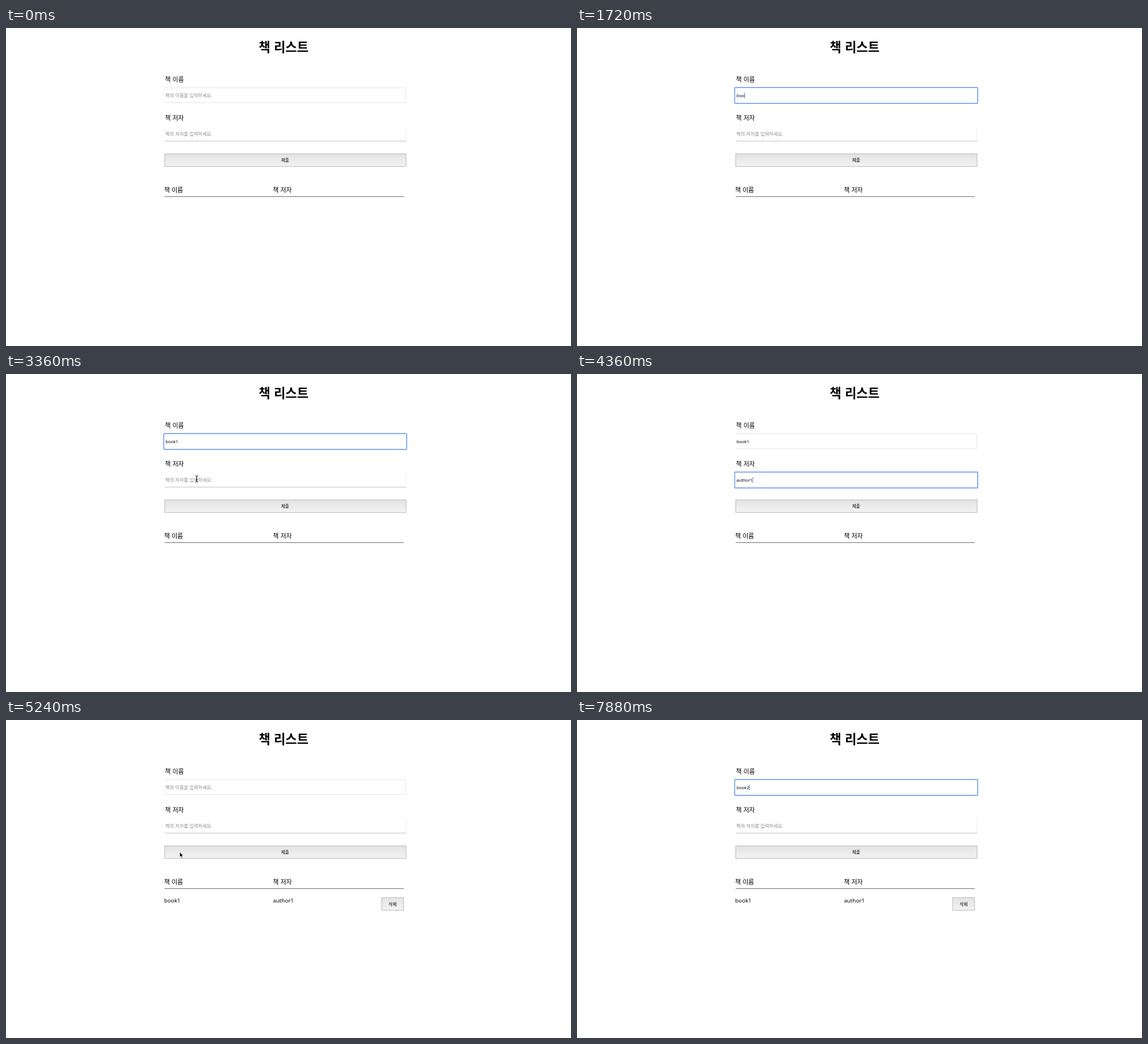
An HTML page for the animation above (8000 ms loop, 997 by 561 pixels).

```html
<!DOCTYPE html>
<html lang="ko">
<head>
<meta charset="utf-8">
<style>
  html, body { margin: 0; width: 100%; height: 100%; overflow: hidden; background: #fff; }
  svg { display: block; font-family: "Noto Sans CJK KR", "Noto Sans CJK JP", sans-serif; }
  .title { font-size: 22.2px; font-weight: 700; text-anchor: middle; }
  .label { font-size: 11px; font-weight: 500; }
  .hint { font-size: 8.3px; fill: #8c8c8c; }
  .typed { font: 7.6px "Noto Sans", sans-serif; }
  .cell { font: 9.8px "Noto Sans", sans-serif; }
  .small { font-size: 7.7px; text-anchor: middle; }
  .button { fill: url(#shade); stroke: #b8b8b8; }
  .ring { fill: #fff; stroke: #84adf0; stroke-width: 2; }
  .caret { fill: #3478c8; }
</style>
</head>
<body>
<svg width="997" height="561" viewBox="0 0 997 561">
  <defs>
    <linearGradient id="shade" x2="0" y2="1">
      <stop offset="0" stop-color="#e3e3e3"/>
      <stop offset=".5" stop-color="#ebebeb"/>
      <stop offset="1" stop-color="#f3f3f3"/>
    </linearGradient>
  </defs>
  <text class="title" x="490" y="42.4">책 리스트</text>
  <text class="label" x="280.5" y="95.2">책 이름</text>
  <text class="label" x="280.5" y="163.2">책 저자</text>

  <g id="name">
    <path d="M280 105.5H705.5V131.5H280" fill="none" stroke="#e4e4e4"/>
    <rect class="ring" x="278.3" y="105" width="428.7" height="28" rx="1"/>
    <text class="hint" x="281" y="122.1">책의 이름을 입력하세요.</text>
    <text class="typed" x="281.5" y="122.3"></text>
    <rect class="caret" y="114" width="1" height="10"/>
  </g>
  <g id="author">
    <path d="M705.5 174V199" fill="none" stroke="#eee"/>
    <path d="M280 199.5H706" stroke="#c2c2c2"/>
    <rect class="ring" x="278.3" y="173" width="428.7" height="28" rx="1"/>
    <text class="hint" x="281" y="190.1">책의 저자를 입력하세요.</text>
    <text class="typed" x="281.2" y="190.3"></text>
    <rect class="caret" y="182" width="1" height="10"/>
  </g>

  <rect class="button" x="280" y="222" width="426" height="22.3"/>
  <text class="small" x="492.5" y="236">제출</text>

  <text class="label" x="279" y="290.2">책 이름</text>
  <text class="label" x="471" y="290.2">책 저자</text>
  <path d="M280 297.5H702" stroke="#6c6c6c"/>

  <g id="row">
    <text class="cell" x="279" y="322">book1</text>
    <text class="cell" x="471" y="322">author1</text>
    <rect class="button" x="663" y="313.3" width="38.5" height="22.3"/>
    <text class="small" x="682.3" y="327.5">삭제</text>
  </g>

  <path id="arrow" d="M0 0V9L2.1 7.1L3.7 10.6L5.2 9.9L3.7 6.5H6.4Z" stroke="#fff" stroke-width=".7"/>
  <path id="beam" d="M-2.5 -5.5Q0 -5.5 0 -4Q0 -5.5 2.5 -5.5M0 -4V4M-2.5 5.5Q0 5.5 0 4Q0 5.5 2.5 5.5M-1.3 1.5H1.3" fill="none" stroke="#111"/>
</svg>
<script>
const LOOP = 8000, STEP = 40;
const $ = id => document.getElementById(id);
const show = (el, on) => el.style.display = on ? '' : 'none';
const within = (t, [a, b]) => t >= a && t < b;

// Each session: focus time, blur time, caret end, text, key times
const sessions = {
  name: [
    { focus: [800, 3400], clear: 5200, caretEnd: 2640, text: 'book1', keys: [1360, 1640, 1720, 1920, 2400] },
    { focus: [6240, LOOP], clear: LOOP, caretEnd: LOOP, text: 'book2', keys: [6520, 6880, 6960, 7520, 7880] }
  ],
  author: [
    { focus: [3400, 5200], clear: 5200, caretEnd: 4960, text: 'author1', keys: [3760, 3920, 4000, 4080, 4160, 4200, 4360] }
  ]
};

// Pointer trips: time, x, y
const trips = [
  [[360, 440, 372], [560, 436, 240], [720, 435, 127], [800, 435, 121], [1360, 435, 121]],
  [[2480, 435, 119], [2600, 434, 107], [2840, 395, 132], [3080, 346, 172], [3200, 336.5, 181], [3280, 336.5, 185], [3760, 336.5, 185]],
  [[4600, 336.5, 185], [4760, 325, 207], [4960, 308, 231], [5080, 306.5, 233],
   [5560, 306.5, 233], [5760, 324, 195], [5960, 360, 135], [6040, 365.5, 127], [6520, 365.5, 127]]
];

function pointerAt(t) {
  const trip = trips.find(p => within(t, [p[0][0], p.at(-1)[0]]));
  if (!trip) return null;
  const i = trip.findIndex(p => p[0] > t);
  const [t0, x0, y0] = trip[i - 1], [t1, x1, y1] = trip[i];
  const k = (t - t0) / (t1 - t0);
  return [x0 + (x1 - x0) * k, y0 + (y1 - y0) * k];
}

function drawField(id, t) {
  const part = name => $(id).querySelector('.' + name);
  const now = sessions[id].find(s => within(t, [s.focus[0], s.clear]));
  const count = now ? now.keys.filter(k => k <= t).length : 0;
  const typed = part('typed'), caret = part('caret');
  typed.textContent = now ? now.text.slice(0, count) : '';
  show(part('hint'), !count);
  show(part('ring'), now && within(t, now.focus));
  show(caret, count && t < now.caretEnd);
  if (count) caret.setAttribute('x', +typed.getAttribute('x') + typed.getComputedTextLength());
}

function draw(t) {
  drawField('name', t);
  drawField('author', t);
  show($('row'), t >= 5200);
  const at = pointerAt(t);
  const overField = at && (within(at[1], [105, 133]) || within(at[1], [173, 201]));
  show($('beam'), overField);
  show($('arrow'), at && !overField);
  if (at) $(overField ? 'beam' : 'arrow').setAttribute('transform', `translate(${at})`);
}

const start = performance.now();
function tick() {
  const t = (performance.now() - start) % LOOP;
  draw(Math.floor(t / STEP) * STEP);
  requestAnimationFrame(tick);
}
tick();
</script>
</body>
</html>
```
